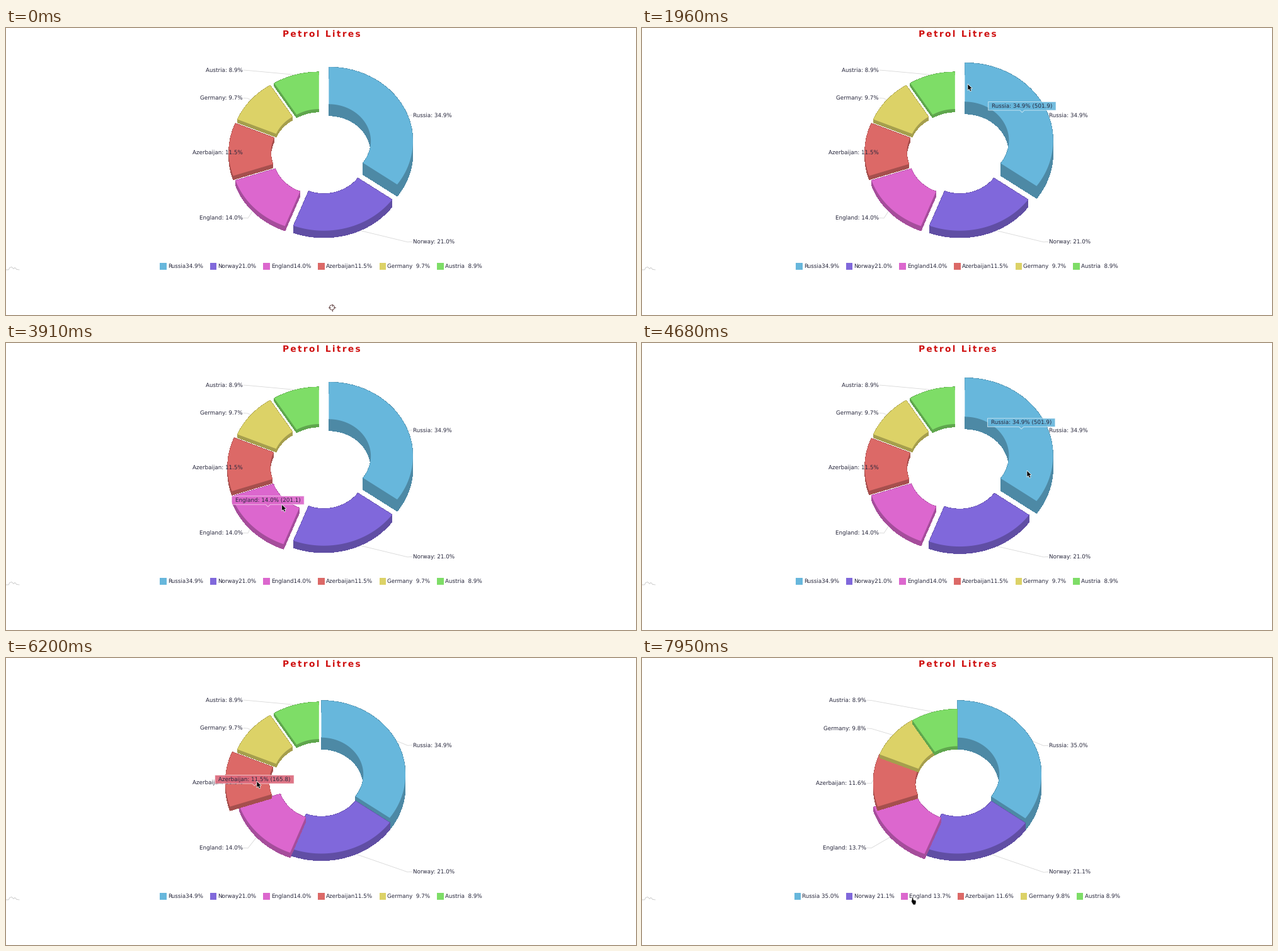
Recreate the animation shown at these times as a matplotlib script. Size 1000 by 457 pixels, loop 8 s.

```python
import numpy as np
import matplotlib.pyplot as plt
from matplotlib.animation import FuncAnimation
from matplotlib.collections import PolyCollection
from matplotlib.colors import to_rgb
from matplotlib.patches import Circle, Polygon, Rectangle

W, H, DPI = 1000, 457, 64
LOOP, STEP = 8000, 40
PT = 72 / DPI
plt.rcParams["font.family"] = "DejaVu Sans"
plt.rcParams["text.hinting"] = "none"

NAMES = ["Russia", "Norway", "England", "Azerbaijan", "Germany", "Austria"]
VALUES = np.array([501.9, 301.9, 201.1, 165.8, 139.9, 128.3])
COLORS = np.array([to_rgb(c) for c in
                   ("#67b7dc", "#8068db", "#dc67ce", "#dc6967", "#dcd267", "#7edd67")])
INK = "#27273c"
TEXT = 8.7

CENTER = np.array([500.5, 204.3])
RADIUS = np.array([133.5, 118.25])
HOLE = .5
DEPTH = 18.5 / VALUES[0]

# Pointer stops: time, x, y
PATH = np.array([
    (90, 517, 440), (560, 530, 130), (840, 538, 100), (1330, 531, 99),
    (1650, 522, 89), (1960, 517, 89), (2560, 420, 120), (3160, 407, 158),
    (3700, 395, 230), (4100, 490, 290), (4680, 611, 203), (5300, 545, 285),
    (5900, 425, 262), (6200, 398, 196), (6700, 410, 140), (7120, 478, 119),
    (7400, 470, 120), (7740, 428, 381)])
CLICKING_FROM, CLICK_DELAY = 4300, 240
LEGEND_HOVER, RELAYOUT = 7700, 7920
ARROW = np.array([(0, 0), (0, 10.5), (2.3, 8.4), (4, 12), (6, 11), (4.4, 7.6), (7.2, 7.2)])
HAND = np.array([(1, 0), (2.4, 0), (3, 4), (7, 5.2), (7, 9), (5.8, 12), (2.4, 12), (-.5, 7)])


def ease(elapsed, duration=300):
    p = np.clip(elapsed / duration, 0, 1)
    return 1 - (1 - p) ** 3


def direction(turn):
    angle = 2 * np.pi * np.asarray(turn)
    return np.stack([np.sin(angle), -np.cos(angle)], axis=-1)


def pointer(t):
    return np.array([np.interp(t, PATH[:, 0], PATH[:, k]) for k in (1, 2)])


def slice_under(point):
    x, y = (point - CENTER + (0, 8)) / RADIUS
    if not HOLE < np.hypot(x, y) < 1.05:
        return None
    turn = np.arctan2(x, -y) / (2 * np.pi) % 1
    return int(np.searchsorted(np.cumsum(VALUES) / VALUES.sum(), turn))


def find_hovers():
    hovers = [(0, None)]
    for t in range(0, LOOP, 4):
        item = slice_under(pointer(t))
        if item != hovers[-1][1]:
            hovers.append((t, item))
    return hovers


HOVERS = find_hovers()
CLICKS = [next(t for t, item in HOVERS if item == i and t > CLICKING_FROM) + CLICK_DELAY
          for i in range(len(NAMES))]


def values_at(t):
    values = VALUES.copy()
    if t >= RELAYOUT:
        values[2] -= 5
    return values


def percent(i, values):
    return f"{100 * values[i] / values.sum():.1f}%"


def hover_level(i, t):
    level = ease(t - LEGEND_HOVER) if i == 2 else 0
    ends = [start for start, _ in HOVERS[1:]] + [LOOP]
    for (start, item), end in zip(HOVERS, ends):
        if item == i:
            level += ease(t - start) - ease(t - end, 600)
    return np.clip(level, 0, 1)


def slice_pose(i, t):
    """Turn range, base centre, scale and depth of one slice."""
    values = values_at(t)
    ends = np.cumsum(values) / values.sum()
    start = ends[i] - values[i] / values.sum()
    popped = 1 - ease(t - CLICKS[i], 400)
    center = CENTER + .1 * popped * RADIUS * direction((start + ends[i]) / 2)
    scale = 1 + .05 * hover_level(i, t)
    return start, ends[i], center, scale, DEPTH * values[i] * scale


def slice_point(i, t, reach):
    start, end, center, scale, depth = slice_pose(i, t)
    point = center + reach * scale * RADIUS * direction((start + end) / 2)
    return point - (0, depth)


fig = plt.figure(figsize=(W / DPI, H / DPI), dpi=DPI, facecolor="white")
ax = fig.add_axes([0, 0, 1, 1])
ax.set(xlim=(0, W), ylim=(H, 0))
ax.axis("off")


def put(x, y, text="", size=TEXT, ha="left", color=INK, z=20, **kw):
    return ax.text(x, y, text, fontsize=size * PT, ha=ha, va="baseline",
                   color=color, zorder=z, **kw)


def text_width(artist):
    return artist.get_window_extent(fig.canvas.get_renderer()).width


# Fixed parts
put(501, 13.3, "\u2006".join("Petrol Litres"), 13.8, "center", "#cf1111", weight="bold")
ax.plot([0, 4, 6, 9, 12, 14, 17, 21], [385, 385, 381.5, 380.5, 383.5, 381.5, 384.5, 385],
        color="#c4c4c4", lw=.8 * PT)

# Chart parts
sides, tops, ticks, labels, swatches, entries = [], [], [], [], [], []
for i, color in enumerate(COLORS):
    sides.append(ax.add_collection(PolyCollection(
        [], facecolor=color * .75, lw=0, antialiased=False, zorder=5 + i)))
    tops.append(ax.add_patch(Polygon(np.zeros((3, 2)), fc=color, lw=0, zorder=5.5 + i)))
    ticks.append(ax.plot([], [], color="#d6d6d6", lw=.8 * PT, zorder=3)[0])
    labels.append(put(0, 0, ha="left" if i < 2 else "right"))
    swatches.append(ax.add_patch(Rectangle((0, 374), 10.5, 10.5, fc=color, lw=0)))
    entries.append(put(0, 381.8))

tip_box = ax.add_patch(Polygon(np.zeros((3, 2)), ec="white", lw=PT, zorder=30))
tip_text = put(0, 0, ha="center", z=31)

cursor = ax.add_patch(Polygon(ARROW, fc="black", ec="white", lw=.7 * PT, zorder=40))
crosshair = [ax.add_patch(Circle((517.5, 445), 4, fill=False, ec="#5a3a3a", lw=.9 * PT))]
for dx, dy in [(1, 0), (-1, 0), (0, 1), (0, -1)]:
    crosshair += ax.plot([517.5 + 2.5 * dx, 517.5 + 5.5 * dx],
                         [445 + 2.5 * dy, 445 + 5.5 * dy], color="#5a3a3a", lw=.9 * PT)


def draw_slice(i, t):
    start, end, center, scale, depth = slice_pose(i, t)
    arc = direction(np.linspace(start, end, 48)) * RADIUS * scale
    base = center + np.concatenate([arc, HOLE * arc[::-1]])
    top = base - (0, depth)
    after, top_after = np.roll(base, -1, axis=0), np.roll(top, -1, axis=0)
    sides[i].set_verts(np.stack([base, after, top_after, top], axis=1))
    tops[i].set_xy(top)


def draw_label(i, t):
    start, end, *_ = slice_pose(i, t)
    y = 203.6 + 142.4 * direction((start + end) / 2)[1]
    on_right = i < 2
    x = 645.5 if on_right else 356 if t >= RELAYOUT else 376
    labels[i].set_position((x, y + 3.1))
    labels[i].set_text(f"{NAMES[i]}: {percent(i, values_at(t))}")
    away = -1 if on_right else 1
    edge_x, edge_y = slice_point(i, t, 1)
    ticks[i].set_data([edge_x, x + 8 * away, x + away], [edge_y, y + .8, y + .3])


def draw_legend(t):
    values = values_at(t)
    for i, (name, entry) in enumerate(zip(NAMES, entries)):
        share = percent(i, values)
        # The first layout pads the share to a fixed column
        entry.set_text(f"{name} {share}" if t >= RELAYOUT else name + share.rjust(5, "\u2007"))
    indent, gap = 12.8, 10.7
    widths = [indent + text_width(entry) for entry in entries]
    x = (W - sum(widths) - gap * (len(widths) - 1)) / 2
    for swatch, entry, width in zip(swatches, entries, widths):
        swatch.set_x(x)
        entry.set_x(x + indent)
        x += width + gap


def draw_tooltip(t):
    k = max(n for n, (start, _) in enumerate(HOVERS) if start <= t)
    start, item = HOVERS[k]
    before = HOVERS[k - 1][1] if k else None
    p = ease(t - start)
    shown = before if item is None else item
    alpha = 1 - p if item is None else p if before is None else 1
    visible = shown is not None and alpha > .05
    tip_box.set_visible(visible)
    tip_text.set_visible(visible)
    if not visible:
        return
    point, color = slice_point(shown, t, .73), COLORS[shown]
    if item is not None and before is not None:
        point = point + (1 - p) * (slice_point(before, t, .73) - point)
        color = color + (1 - p) * (COLORS[before] - color)

    tip_text.set_text(f"{NAMES[shown]}: {percent(shown, VALUES)} ({VALUES[shown]:.1f})")
    half = text_width(tip_text) / 2 + 5.5
    x, bottom = point - (0, 7)
    top = bottom - 13.5
    tip_box.set_xy([(x - half, top), (x + half, top), (x + half, bottom), (x + 3.5, bottom),
                    (x, bottom + 3.5), (x - 3.5, bottom), (x - half, bottom)])
    tip_box.set_facecolor((*color, .92 * alpha))
    tip_box.set_edgecolor((1, 1, 1, .6 * alpha))
    tip_text.set_position((x, top + 9.8))
    tip_text.set_alpha(alpha)


def draw_pointer(t):
    moving = t >= PATH[0, 0]
    for part in crosshair:
        part.set_visible(not moving)
    cursor.set_visible(moving)
    cursor.set_xy((HAND if t >= LEGEND_HOVER else ARROW) + pointer(t))


def update(frame):
    t = frame * STEP
    for i in range(len(NAMES)):
        draw_slice(i, t)
        draw_label(i, t)
    draw_legend(t)
    draw_tooltip(t)
    draw_pointer(t)
    return []


anim = FuncAnimation(fig, update, frames=LOOP // STEP, interval=STEP,
                     init_func=lambda: [], repeat=True, repeat_delay=0, blit=False)
plt.show()
```
